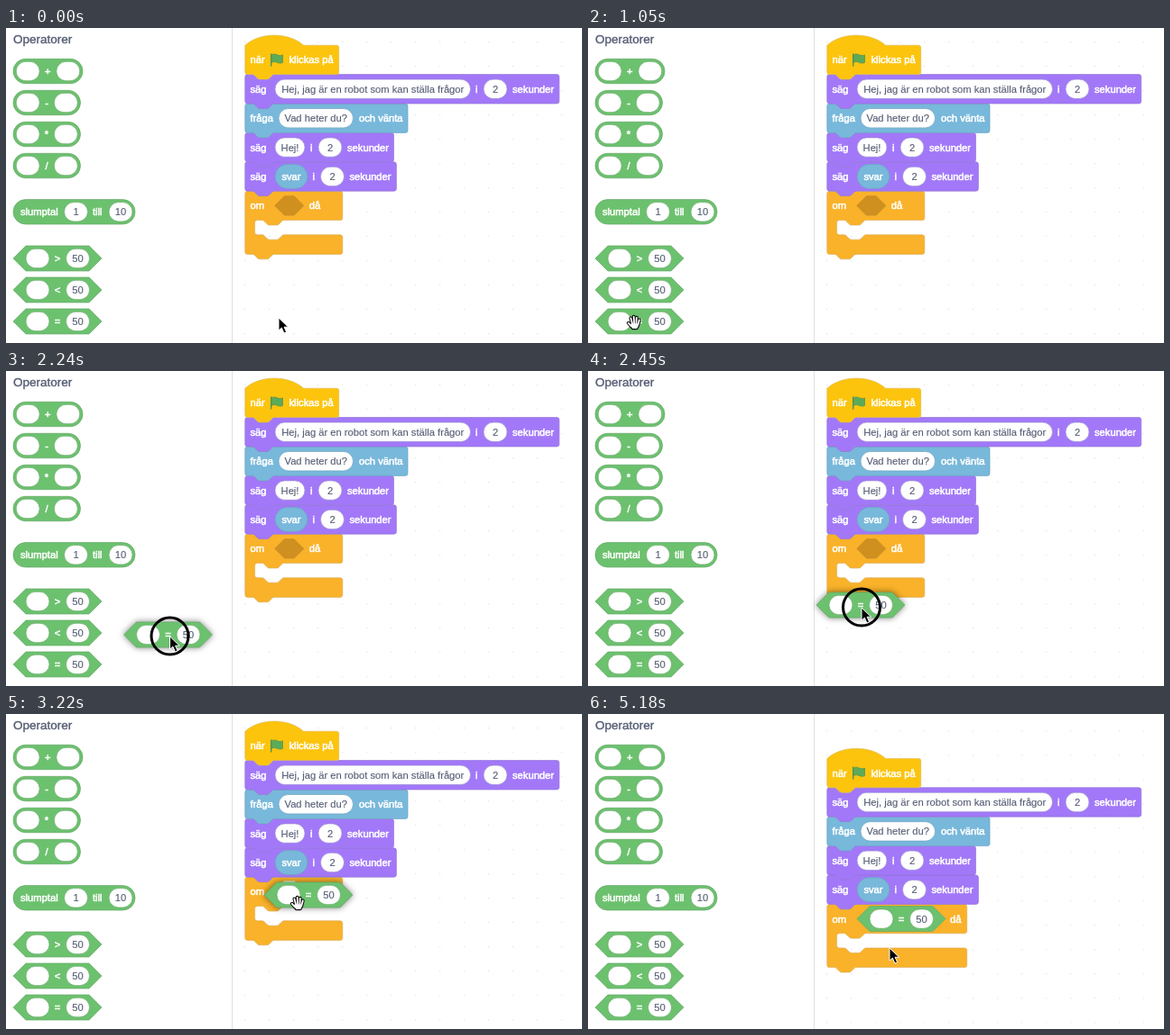
An HTML page for the animation above (5.25 s loop, 638x350 px).

```html
<!DOCTYPE html>
<html lang="sv">
<head>
<meta charset="utf-8">
<title>Operatorer</title>
<style>
html, body { margin: 0; width: 100%; height: 100%; overflow: hidden; background: #fff; }
svg { display: block; width: 638px; height: 350px; }
text { font: 11.2px "Liberation Sans", Arial, sans-serif; }
.label { fill: #fff; stroke: #fff; stroke-width: .55; }
.field { fill: #575e75; stroke: #575e75; stroke-width: .15; }
.title { font-size: 13.5px; fill: #575e75; stroke: #575e75; stroke-width: .4; }
.mid { text-anchor: middle; }
.lift { filter: drop-shadow(0 0 3.5px rgba(0, 0, 0, .5)); }
</style>
</head>
<body>
<svg id="stage" viewBox="0 0 638 350" xmlns="http://www.w3.org/2000/svg"></svg>
<script>
const LOOP = 5250, STEP = 70, UNIT = 0.675, LEFT = 264.8, TOP = 19.2, ROW = 32.4, SCROLL = 30.2;
const COLOR = {
  event: ['#fcc40d', '#dfbd5c'],
  looks: ['#a278f9', '#9274d2'],
  sense: ['#78b8da', '#6ba3c2'],
  control: ['#f9b229', '#dcae5c'],
  op: ['#6cc16e', '#65a968']
};

// Block outlines, in block units
const notch = 'c2 0 3 1 4 2l4 4c1 1 2 2 4 2h12c2 0 3-1 4-2l4-4c1-1 2-2 4-2';
const tab = 'c-2 0-3 1-4 2l-4 4c-1 1-2 2-4 2h-12c-2 0-3-1-4-2l-4-4c-1-1-2-2-4-2';
const topEdge = `M0 4a4 4 0 0 1 4-4H12${notch}`;
const rightSide = (w, h) => `H${w - 4}a4 4 0 0 1 4 4v${h - 8}a4 4 0 0 1-4 4`;
const bottomEdge = `H48${tab}H4a4 4 0 0 1-4-4z`;

const stack = w => topEdge + rightSide(w, 48) + bottomEdge;
const hat = w => 'M0 0c25-22 71-22 96 0' + rightSide(w, 48) + bottomEdge;
const cShape = w => topEdge + rightSide(w, 48) +
  `H64${tab}h-8a4 4 0 0 0-4 4v16a4 4 0 0 0 4 4h8${notch}` + rightSide(w, 32) + bottomEdge;

const block = (d, kind, row) => `<path d="${d}" fill="${COLOR[kind][0]}" stroke="${COLOR[kind][1]}"
  transform="translate(${LEFT} ${TOP + row * ROW}) scale(${UNIT})"/>`;
const label = (x, y, s, cls = '') => `<text class="label ${cls}" x="${x}" y="${y + 4}">${s}</text>`;
const pill = (x, y, w, h, fill, stroke) => `<rect x="${x}" y="${y - h / 2}" width="${w}" height="${h}"
  rx="${h / 2}" fill="${fill}" stroke="${stroke}" stroke-width=".7"/>`;
const field = (x, y, w, s = '', line = '#9a8cd0') => pill(x, y, w, 21.4, '#fff', line) +
  `<text class="field mid" x="${x + w / 2}" y="${y + 4}">${s}</text>`;
const hex = (x, y, w, h, fill, stroke, extra = '') => {
  const r = h / 2;
  return `<path d="M${x} ${y}l${r} ${-r}h${w - h}l${r} ${r}l${-r} ${r}h${h - w}z"
    fill="${fill}" stroke="${stroke}" ${extra}/>`;
};

const green = COLOR.op;
const compare = (sign, y) => hex(8, y, 98, 28, ...green, 'stroke-width=".7"') +
  field(22, y, 26, '', green[1]) + label(57, y, sign, 'mid') + field(66.5, y, 26, '50', green[1]);
// The block is as wide as its sign needs
const arith = (sign, y) => {
  const w = sign === '+' ? 6.5 : 4;
  return pill(8, y, 70.5 + w, 27.4, ...green) + field(11.2, y, 26, '', green[1]) +
    label(43 + w / 2, y, sign, 'mid') + field(49.3 + w, y, 26, '', green[1]);
};

const rowY = i => TOP + (i + .5) * ROW;
const sayEnd = (x, y) => label(x, y, 'i') + field(x + 9, y, 26, '2') + label(x + 41, y, 'sekunder');

function script() {
  const [h, a, q, b, c, d] = [0, 1, 2, 3, 4, 5].map(rowY);
  return [
    `<g id="narrow">${block(cShape(160), 'control', 5)}${label(342, d, 'd\u00e5', 'mid')}
      ${hex(297.8, d, 32, 21.4, '#cf901f', '#c08a2c', 'id="slot"')}</g>`,
    `<g id="wide">${block(cShape(229.5), 'control', 5)}${label(407.3, d, 'd\u00e5', 'mid')}
      <g transform="translate(290 ${d - 326})">${compare('=', 326)}</g></g>`,
    label(270.5, d, 'om'),
    block(stack(248.3), 'looks', 4), label(270.5, c, 's\u00e4g'),
    pill(298, c, 36, 27, ...COLOR.sense), label(316, c, 'svar', 'mid'), sayEnd(339.5, c),
    block(stack(244), 'looks', 3), label(270.5, b, 's\u00e4g'), field(298, b, 33, 'Hej!'), sayEnd(337, b),
    block(stack(267), 'sense', 2), label(270.5, q, 'fr\u00e5ga'),
    field(302, q, 82.5, 'Vad heter du?', '#6ba3c2'), label(391, q, 'och v\u00e4nta'),
    block(stack(515.5), 'looks', 1), label(270.5, a, 's\u00e4g'),
    field(298, a, 216.5, 'Hej, jag \u00e4r en robot som kan st\u00e4lla fr\u00e5gor'), sayEnd(520, a),
    block(hat(154), 'event', 0), label(270.5, h, 'n\u00e4r'),
    `<path d="M294 ${h - 5.5}c5-3 7 2.5 12.5 0v8.5c-5.5 2.5-7.5-3-12.5 0z" fill="#5cab58"
      stroke="#5b9450" stroke-width=".8"/><path d="M293.7 ${h - 6.5}v13" stroke="#5b9450"
      stroke-width="1.5" stroke-linecap="round"/>`,
    label(313.5, h, 'klickas p\u00e5')
  ].join('');
}

// Cursors, centred on the hot spot
function hand(id, scale, fingers, palm) {
  return `<g id="${id}" stroke-linecap="round" stroke-linejoin="round"><g transform="scale(${scale})">
    <path d="${fingers}" fill="none" stroke="#111" stroke-width="3.9"/>
    <path d="${palm}" fill="#111" stroke="#111" stroke-width="2.5"/>
    <path d="${fingers}" fill="none" stroke="#fff" stroke-width="1.8"/>
    <path d="${palm}" fill="#fff"/></g></g>`;
}
const palm = 'M-3.5 1.5L5 1.5L4.8 4L3.2 7H-1.6L-3.8 4z';
const cursors = `<g id="cursor">
  <path id="arrow" d="M0 0V14.2l3.3-3.1 2.6 5.9 2.7-1.2-2.5-5.6h4.5z" fill="#000" stroke="#fff" stroke-width="1"/>
  ${hand('open', 1, 'M-3.6-4.6L-1.8 2M-.3-6.2L.2 2M2.8-5.2L2.4 2M5.8-2.6L4.3 3M-6.2.8L-3 4.4', palm)}
  ${hand('closed', .88, 'M-3.4-2.2L-2.4 2M-.5-3L-.2 2M2.2-2.6L2.1 2M4.9-1.6L4.4 3M-5.2 1.4L-3 4', palm)}
</g>`;

const stage = document.getElementById('stage');
stage.innerHTML = `
<defs>
  <pattern id="dots" x="264" y="15" width="27" height="27" patternUnits="userSpaceOnUse">
    <rect width="1.2" height="1.2" fill="#e2e2e2"/>
  </pattern>
  <clipPath id="area"><rect x="251" width="387" height="350"/></clipPath>
</defs>
<rect width="638" height="350" fill="#fff"/>
<g clip-path="url(#area)"><g id="script">
  <rect x="251" y="-60" width="387" height="420" fill="url(#dots)"/>${script()}
</g></g>
<path d="M250.5 0V350" stroke="#dfdfdf"/>
<text class="title" x="8" y="17">Operatorer</text>
${['+', '-', '*', '/'].map((s, i) => arith(s, 48 + 35 * i)).join('')}
${pill(8, 204.3, 135, 27.4, ...green)}${label(16, 204.3, 'slumptal')}
${field(64.5, 204.3, 26, '1', green[1])}${label(96, 204.3, 'till')}${field(114, 204.3, 26, '10', green[1])}
${['&gt;', '&lt;', '='].map((s, i) => compare(s, 256 + 35 * i)).join('')}
<g id="drag" class="lift">${compare('=', 326)}</g>
${cursors}
<circle id="ring" fill="none" stroke="#000" stroke-width="3"/>`;

// Motion tables: [time, ...values]
const POINTER = [
  [140, 302, 322], [980, 51, 327], [1120, 51, 327], [1400, 60, 327], [2030, 60, 327],
  [2450, 303, 263], [2870, 336, 204], [3080, 336, 204], [3220, 323, 210],
  [4760, 323, 210], [5180, 334, 260]
];
const CARRY = [[2030, 0, 0], [2450, 245, -66], [2870, 278, -125]];
const GRAB = 1890, LET_GO = 3150, DROP = 3290;
const RING = [[GRAB, 36], [2030, 20.5]];

const ease = p => p * p * (3 - 2 * p);
function at(table, t, curve = ease) {
  const i = table.findIndex(k => k[0] > t);
  if (i === 0) return table[0].slice(1);
  if (i < 0) return table[table.length - 1].slice(1);
  const a = table[i - 1], b = table[i], p = curve((t - a[0]) / (b[0] - a[0]));
  return a.slice(1).map((v, j) => v + (b[j + 1] - v) * p);
}

const el = id => document.getElementById(id);
const move = (id, x, y) => el(id).setAttribute('transform', `translate(${x} ${y})`);
const show = (id, on) => el(id).setAttribute('display', on ? 'inline' : 'none');

function cursorKind(t, x, y) {
  if (t < GRAB) return x < 104 ? 'open' : 'arrow';
  if (t < LET_GO) return x < 104 ? 'closed' : 'arrow';
  return y > 244 ? 'arrow' : 'open';
}

function draw(t) {
  const [x, y] = at(POINTER, t), [cx, cy] = at(CARRY, t);
  const dropped = t >= DROP, pressed = t >= GRAB && t < LET_GO;
  move('cursor', x, y);
  const kind = cursorKind(t, x, y);
  ['arrow', 'open', 'closed'].forEach(k => show(k, k === kind));

  show('ring', pressed);
  const ring = el('ring');
  ring.setAttribute('cx', x);
  ring.setAttribute('cy', y - .5);
  ring.setAttribute('r', at(RING, t, p => p)[0]);

  show('drag', t > 2030 && !dropped);
  move('drag', cx, cy);
  const near = !dropped && cy < -100;
  el('slot').setAttribute('stroke', near ? '#fff' : '#c08a2c');
  el('slot').setAttribute('stroke-width', near ? 2.4 : .7);

  show('narrow', !dropped);
  show('wide', dropped);
  move('script', 0, dropped ? SCROLL : 0);
}

const start = performance.now();
function tick() {
  const t = (performance.now() - start) % LOOP;
  draw(Math.floor(t / STEP) * STEP);
  requestAnimationFrame(tick);
}
draw(0);
requestAnimationFrame(tick);
</script>
</body>
</html>
```
